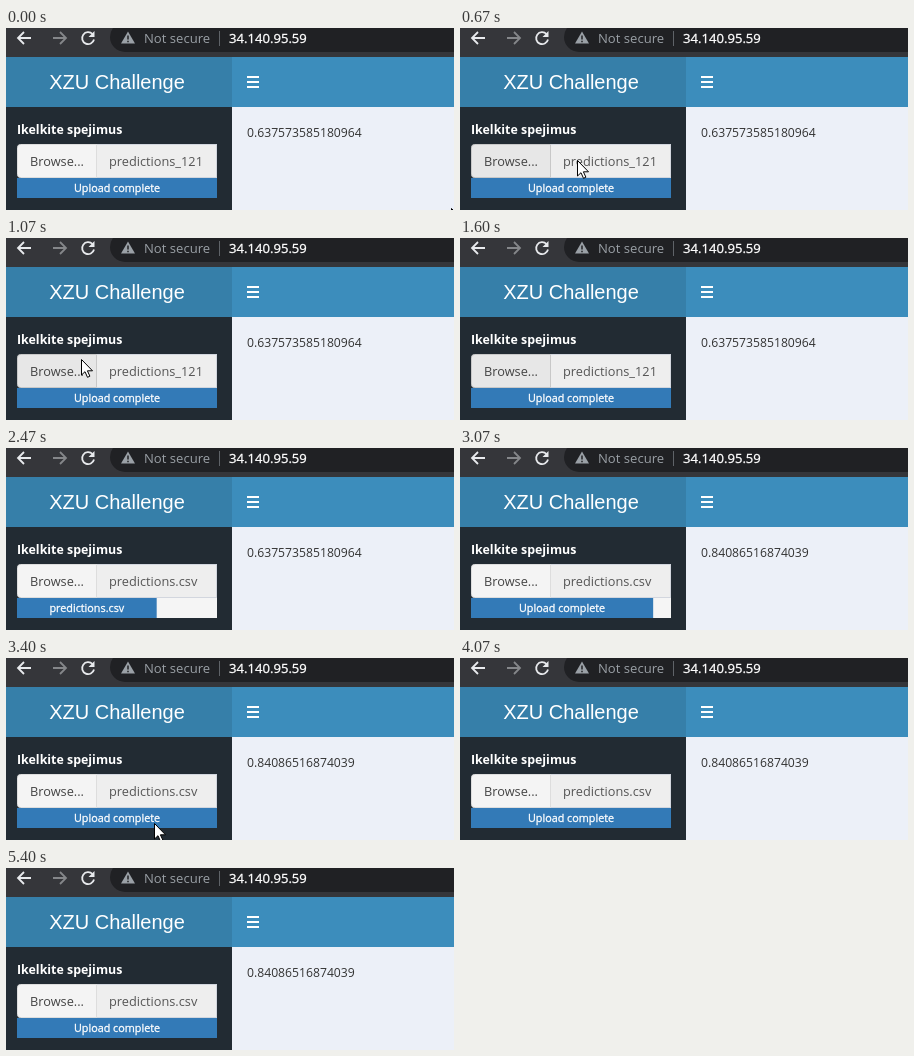
An HTML page that plays this animation: 448 px wide and 182 px high, repeating every 5.54 s.

```html
<!DOCTYPE html>
<html lang="lt">
<head>
<meta charset="utf-8">
<title>Upload</title>
<style>
html, body { margin: 0; width: 100%; height: 100%; overflow: hidden; background: #222b33; }
svg { display: block; width: 448px; height: 182px; font: 12.75px "Open Sans", "Noto Sans", sans-serif; }
.url { font-size: 13.1px; }
.title { font: 20px "Liberation Sans", Arial, sans-serif; }
.label { font-size: 12.4px; font-weight: 700; }
.status { font-size: 10.8px; }
.score { font-size: 12.2px; }
.strong { fill: #fff; stroke: #fff; stroke-width: .3; }
.icon { fill: none; stroke-width: 1.8; }
</style>
</head>
<body>
<svg viewBox="0 0 448 182">
  <!-- browser toolbar -->
  <rect width="448" height="29" fill="#35363a"/>
  <rect x="104" y="-6" width="380" height="30" rx="15" fill="#202124"/>
  <path class="icon" stroke="#e8eaed" d="M25 10H12M18 4L12 10L18 16"/>
  <path class="icon" stroke="#85878a" d="M47 10H60M54 4L60 10L54 16"/>
  <path class="icon" stroke="#e8eaed" d="M86.5 6A6 6 0 1 0 88 11.5"/>
  <path fill="#e8eaed" d="M88.5 3V9H82.5Z"/>
  <path fill="#9aa0a6" d="M122 3.5L129 15.5H115Z"/>
  <path stroke="#202124" stroke-width="1.5" d="M122 7.5V11.5M122 12.7V14.2"/>
  <text class="url" x="138" y="14.5" fill="#9aa0a6">Not secure</text>
  <rect x="213" y="3" width="1" height="15" fill="#5f6368"/>
  <text class="url strong" x="223" y="14.5">34.140.95.59</text>

  <!-- page header and content -->
  <rect y="29" width="226" height="50" fill="#367fa9"/>
  <rect x="226" y="29" width="222" height="50" fill="#3c8dbc"/>
  <text class="title" x="111" y="61" text-anchor="middle" fill="#fff">XZU Challenge</text>
  <path stroke="#fff" stroke-width="2" d="M241 49H253M241 54H253M241 59H253"/>
  <rect x="226" y="79" width="222" height="103" fill="#ecf0f8"/>
  <text class="score" id="score" x="241" y="109" fill="#333"></text>

  <!-- file input -->
  <text class="label" x="11" y="106" fill="#fff">Ikelkite spejimus</text>
  <rect x="90.5" y="116.5" width="120" height="33" fill="#eee" stroke="#d2d6de"/>
  <path id="button" d="M90.5 116.5H14.5Q11.5 116.5 11.5 119.5V146.5Q11.5 149.5 14.5 149.5H90.5Z"/>
  <text x="24" y="138" fill="#444">Browse...</text>
  <text id="file" x="103" y="138" fill="#555"></text>
  <rect x="11" y="150" width="200" height="20" fill="#f5f5f5"/>
  <rect id="bar" x="11" y="150" height="20" fill="#337ab7"/>
  <text class="status strong" id="status" y="164" text-anchor="middle"></text>

  <path id="cursor" fill="#fff" stroke="#000" d="M.5 .5V16L4 12.7L6.5 18.3L8.9 17.2L6.4 11.8H11.5Z"/>
</svg>
<script>
const LOOP = 5540, STEP = 1000 / 15;
const $ = id => document.getElementById(id);

// Pointer paths: [step, x, y]; the pointer is off stage between paths.
const paths = [
  [[0, 445, 180], [3, 445, 180], [7, 205, 147], [11, 88, 127], [12, 88, 127],
   [16, 75, 121], [18, 75, 121], [21, 164, 149], [23, 277, 172]],
  [[47, 200, 176], [51, 148, 165], [52, 148, 165], [54, 134, 147],
   [55, 127, 151], [59, 127, 151], [60, 117, 167]]
];

function pointerAt(step) {
  for (const path of paths) {
    for (let i = 0; i < path.length - 1; i++) {
      const [s0, x0, y0] = path[i], [s1, x1, y1] = path[i + 1];
      if (step < s0 || step > s1) continue;
      const k = (step - s0) / (s1 - s0);
      return [x0 + (x1 - x0) * k, y0 + (y1 - y0) * k];
    }
  }
  return null;
}

// CSS "ease": cubic-bezier(.25, .1, .25, 1)
function ease(x) {
  if (x <= 0) return 0;
  if (x >= 1) return 1;
  let lo = 0, hi = 1, s;
  for (let i = 0; i < 20; i++) {
    s = (lo + hi) / 2;
    if (.75 * s * (1 - s) + s ** 3 < x) lo = s; else hi = s;
  }
  return .3 * s * (1 - s) ** 2 + 3 * s * s * (1 - s) + s ** 3;
}

// The bar shrinks on reset; the upload interrupts that and fills it again.
const RESET = 2345, FILL = 2695;
const shrink = t => 1 - ease((t - RESET) / 600);
function progress(t) {
  if (t < FILL) return shrink(t);
  const from = shrink(FILL);
  return from + (1 - from) * ease((t - FILL) / 600);
}

function draw(now) {
  const step = Math.floor((now % LOOP) / STEP + .06);
  const width = 200 * progress(step * STEP);
  const picked = step >= 35, done = step >= 45;
  const hover = step >= 10 && !picked;

  $("button").setAttribute("fill", hover ? "#e7e7e7" : "#f4f4f4");
  $("button").setAttribute("stroke", hover ? "#c8c8c8" : "#ddd");
  $("file").textContent = picked ? "predictions.csv" : "predictions_121";
  $("bar").setAttribute("width", width);
  $("status").textContent = picked && !done ? "predictions.csv" : "Upload complete";
  $("status").setAttribute("x", 11 + Math.max(width, 77) / 2);
  $("score").textContent = step >= 46 ? "0.84086516874039" : "0.637573585180964";

  const pointer = pointerAt(step);
  $("cursor").style.display = pointer ? "" : "none";
  if (pointer) $("cursor").setAttribute("transform", `translate(${pointer.map(Math.round)})`);
}

const start = performance.now();
function tick() {
  draw(performance.now() - start);
  requestAnimationFrame(tick);
}
tick();
</script>
</body>
</html>
```
